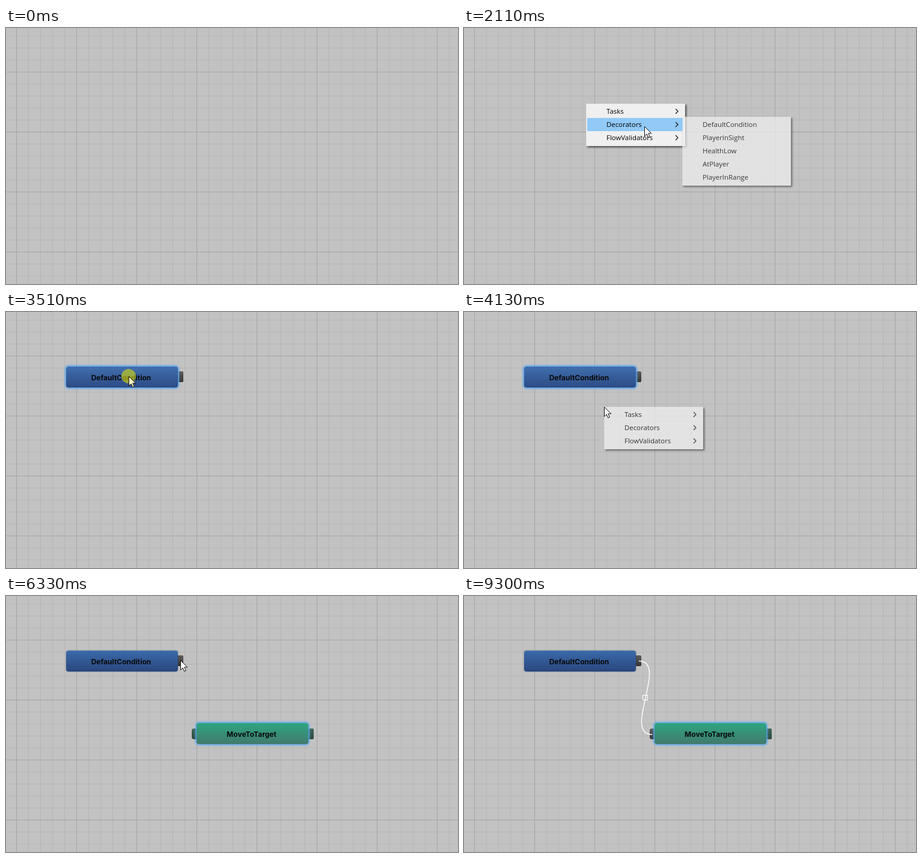
An HTML page for the animation above (9.76 s loop, 752 by 427 pixels).

```html
<!DOCTYPE html>
<html lang="en">
<head>
<meta charset="utf-8">
<title>Node editor</title>
<style>
html, body { margin: 0; width: 100%; height: 100%; overflow: hidden; }
#stage {
  position: relative; width: 752px; height: 427px; overflow: hidden;
  background:
    linear-gradient(90deg, #a4a4a4 1px, transparent 1px) 17px 0 / 100px 100px,
    linear-gradient(#a4a4a4 1px, transparent 1px) 0 73px / 100px 100px,
    linear-gradient(90deg, #b6b6b6 1px, transparent 1px) 17px 0 / 20px 20px,
    linear-gradient(#b6b6b6 1px, transparent 1px) 0 13px / 20px 20px,
    #c2c2c2;
}
#stage > *, .panel, .port, .body { position: absolute; left: 0; top: 0; }
.node { width: 186px; height: 35px; }
.body {
  width: 183px; height: 35px; padding-right: 3px; border-radius: 4px;
  font: 700 12px/38px Inter, sans-serif; text-align: center; color: #080a0c;
  box-shadow: 0 0 2px rgba(30, 40, 60, .6), inset 0 1px rgba(255, 255, 255, .1);
}
.blue .body { background: linear-gradient(#3b6aaa, #29467d); }
.green .body { background: linear-gradient(#5aa08d, #3e6c61); }
.blue.on .body { background: linear-gradient(#406fae, #2d4b84); }
.green.on .body { background: linear-gradient(#2ea582, #427a6d); }
.on .body { box-shadow: 0 0 3px 2px #5ea9ee; }
.port { top: 8px; width: 10px; height: 18px; background: linear-gradient(#5c5c5c, #343434); }
.port.in { left: -8px; border-radius: 4px 0 0 4px; }
.port.out { left: 185px; border-radius: 0 2px 2px 0; }
.green .port { top: 9px; }
.on .port.tint { background: linear-gradient(#41675a, #284a3e); }
.panel {
  box-sizing: border-box; padding: 2px 3px 3px 2px; background: #f0f0f0;
  box-shadow: inset 0 0 0 1px #e6e6e6, 2px 2px 3px rgba(0, 0, 0, .65);
}
.item {
  position: relative; height: 22px; padding-left: 32px; white-space: nowrap;
  font: 11.4px/22px "Open Sans", "Noto Sans", sans-serif; color: #000;
}
.item.hot { background: #91c9f7; }
.item svg { position: absolute; right: 8px; top: 6px; }
.panel.closing { visibility: hidden; }
.panel.closing .hot { visibility: visible; }
#ring { width: 24px; height: 24px; margin: -12px; border-radius: 50%; background: rgba(218, 218, 10, .6); }
#arrow { overflow: visible; fill: #fff; }
#arrow.pressed { fill: #ffffc4; }
</style>
</head>
<body>
<div id="stage">
  <div class="node blue" id="cond"><i class="port out"></i><div class="body">DefaultCondition</div></div>
  <div class="node green" id="move"><i class="port in tint"></i><i class="port out tint"></i><div class="body">MoveToTarget</div></div>
  <svg id="wires" width="752" height="427" fill="none" stroke="#fff">
    <path id="wire" stroke-width="1.4"/>
    <rect id="handle" x="297.5" y="165.5" width="8" height="8"/>
  </svg>
  <div id="menus"></div>
  <div id="ring"></div>
  <svg id="arrow" width="13" height="20"><path d="M.5 .5V16.3L4.2 12.8L6.7 18.6L9.3 17.5L6.8 11.8H11.8Z" stroke="#111"/></svg>
</div>
<script>
const LOOP = 9760, STEP = 76.5, ROW = 22;
const $ = id => document.getElementById(id);
const ramp = (t, from, length) => Math.min(1, Math.max(0, (t - from) / length));
const show = (el, on) => { el.style.display = on ? '' : 'none'; };
const place = (el, { x, y }) => { el.style.transform = `translate(${x}px, ${y}px)`; };

// Where the pointer arrives, when, and how long the button then stays down.
const stop = (at, x, y, press = 0) => ({ at, x, y, press });
const appear = stop(70, 605, 391);
const openFirst = stop(670, 203, 126, 150);
const pickCond = stop(2810, 401, 161, 80);
const grabCond = stop(3120, 313, 148, 470);
const dropCond = stop(3430, 204, 107);
const openSecond = stop(3820, 233, 158, 150);
const pickMove = stop(4760, 458, 193, 80);
const grabMove = stop(5070, 357, 181, 370);
const dropMove = stop(5370, 435, 229);
const startWire = stop(6410, 293, 107, 70);
const endWire = stop(7660, 314, 229, 70);
const stops = [
  appear, stop(220, 250, 184), openFirst,
  stop(1390, 209, 131), stop(1790, 274, 158), stop(2110, 300, 164), stop(2430, 401, 161), pickCond,
  grabCond, dropCond, openSecond, stop(4530, 458, 193), pickMove, grabMove, dropMove,
  stop(5860, 285, 109), stop(6170, 286, 107, 80), startWire,
  stop(6850, 287, 130), stop(7150, 290, 165), stop(7510, 314, 229), endWire,
  stop(8660, 320, 233), stop(9300, 752, 470)
];
const released = s => s.at + s.press;
const joined = t => t >= released(endWire);

// Longer ways take longer; the pointer is sampled in short steps.
function pointer(t) {
  const i = stops.findIndex(s => s.at > t);
  if (i < 0) return stops[stops.length - 1];
  const b = stops[i], a = stops[i - 1] || b;
  const time = Math.min(b.at - a.at, 150 + .8 * Math.hypot(b.x - a.x, b.y - a.y));
  const n = Math.max(1, Math.round(time / STEP));
  const u = Math.min(n - 1, Math.floor(n * ramp(t, b.at - time, time) + .05)) / n;
  return { x: Math.round(a.x + (b.x - a.x) * u), y: Math.round(a.y + (b.y - a.y) * u) };
}

function addMenu(x, y, width, labels, arrows = false) {
  const panel = document.createElement('div');
  const chevron = '<svg width="6" height="10" fill="none" stroke="#111" stroke-width="1.2"><path d="M1 1L5 5L1 9"/></svg>';
  panel.className = 'panel';
  panel.style.cssText = `left:${x}px;top:${y}px;width:${width}px`;
  panel.innerHTML = labels.map(s => `<div class="item">${s}${arrows ? chevron : ''}</div>`).join('');
  $('menus').append(panel);
  return { panel, x, y, width };
}
const root = addMenu(203, 126, 165, ['Tasks', 'Decorators', 'FlowValidators'], true);
const tasks = addMenu(363, 126, 250, ['DefaultTask', 'MoveToTarget', 'RotateToTarget', 'AttackPlayer', 'WaitForSeconds',
  'PlayAnimation', 'SetPatrolDestination', 'SelectNextWaypointOnRoute', 'FleeFromTarget']);
const decorators = addMenu(363, 148, 181, ['DefaultCondition', 'PlayerInSight', 'HealthLow', 'AtPlayer', 'PlayerInRange']);

const sessions = [
  { open: openFirst, pick: pickCond, sub: decorators, subAt: 1970, parent: 1, choice: 0 },
  { open: openSecond, pick: pickMove, sub: tasks, subAt: 4230, parent: 0, choice: 1 }
];

function hovered(menu, p, otherwise) {
  const inside = p.x >= menu.x && p.x < menu.x + menu.width;
  return inside ? Math.floor((p.y - menu.y - 2) / ROW) : otherwise;
}

function setMenu({ panel }, opacity, hot = -1, closing = false) {
  show(panel, opacity > 0);
  panel.style.opacity = opacity;
  panel.classList.toggle('closing', closing);
  [...panel.children].forEach((el, i) => el.classList.toggle('hot', i === hot));
}

function drawMenus(t, p) {
  const s = sessions[t < openSecond.at ? 0 : 1];
  const shift = { x: s.open.x - root.x, y: s.open.y - root.y };
  const local = { x: p.x - shift.x, y: p.y - shift.y };
  const closed = released(s.pick), closing = t >= closed;
  place($('menus'), shift);
  setMenu(decorators, 0);
  setMenu(tasks, ramp(t, 1480, 200) - ramp(t, 1950, 80));
  setMenu(root, closing ? 0 : ramp(t, released(s.open), 220), hovered(root, local, s.parent));
  // The chosen row lingers for a moment after its menu has gone.
  if (closing) setMenu(s.sub, .75 * (1 - ramp(t, closed + 20, 130)), s.choice, true);
  else if (t >= s.subAt) setMenu(s.sub, ramp(t, s.subAt, 200), hovered(s.sub, local, -1));
}

function drawNode(el, t, p, born, home, grab, drop) {
  const held = t < grab.at ? grab : t < drop.at ? p : drop;
  show(el, t >= born);
  place(el, { x: home.x + held.x - grab.x, y: home.y + held.y - grab.y });
}

function drawWire(t, p) {
  const end = joined(t) ? { x: 313, y: 231 } : p;
  show($('wire'), t >= 6640);
  show($('handle'), joined(t));
  $('wire').setAttribute('d', `M291 108.5C341 108.5 ${end.x - 50} ${end.y} ${end.x} ${end.y}`);
}

function render(t) {
  const p = pointer(t), cond = $('cond'), move = $('move');
  const pressed = stops.some(s => t >= s.at && t < released(s));
  drawMenus(t, p);
  drawNode(cond, t, p, released(pickCond), { x: 209, y: 132 }, grabCond, dropCond);
  drawNode(move, t, p, released(pickMove), { x: 239, y: 164 }, grabMove, dropMove);
  cond.classList.toggle('on', t >= grabCond.at && t < grabMove.at);
  move.classList.toggle('on', t >= grabMove.at);
  move.firstChild.classList.toggle('tint', !joined(t));
  drawWire(t, p);
  place($('arrow'), p);
  place($('ring'), p);
  show($('arrow'), t >= appear.at);
  show($('ring'), pressed);
  $('arrow').classList.toggle('pressed', pressed);
}

const start = performance.now();
function tick() {
  render((performance.now() - start) % LOOP);
  requestAnimationFrame(tick);
}
tick();
</script>
</body>
</html>
```
